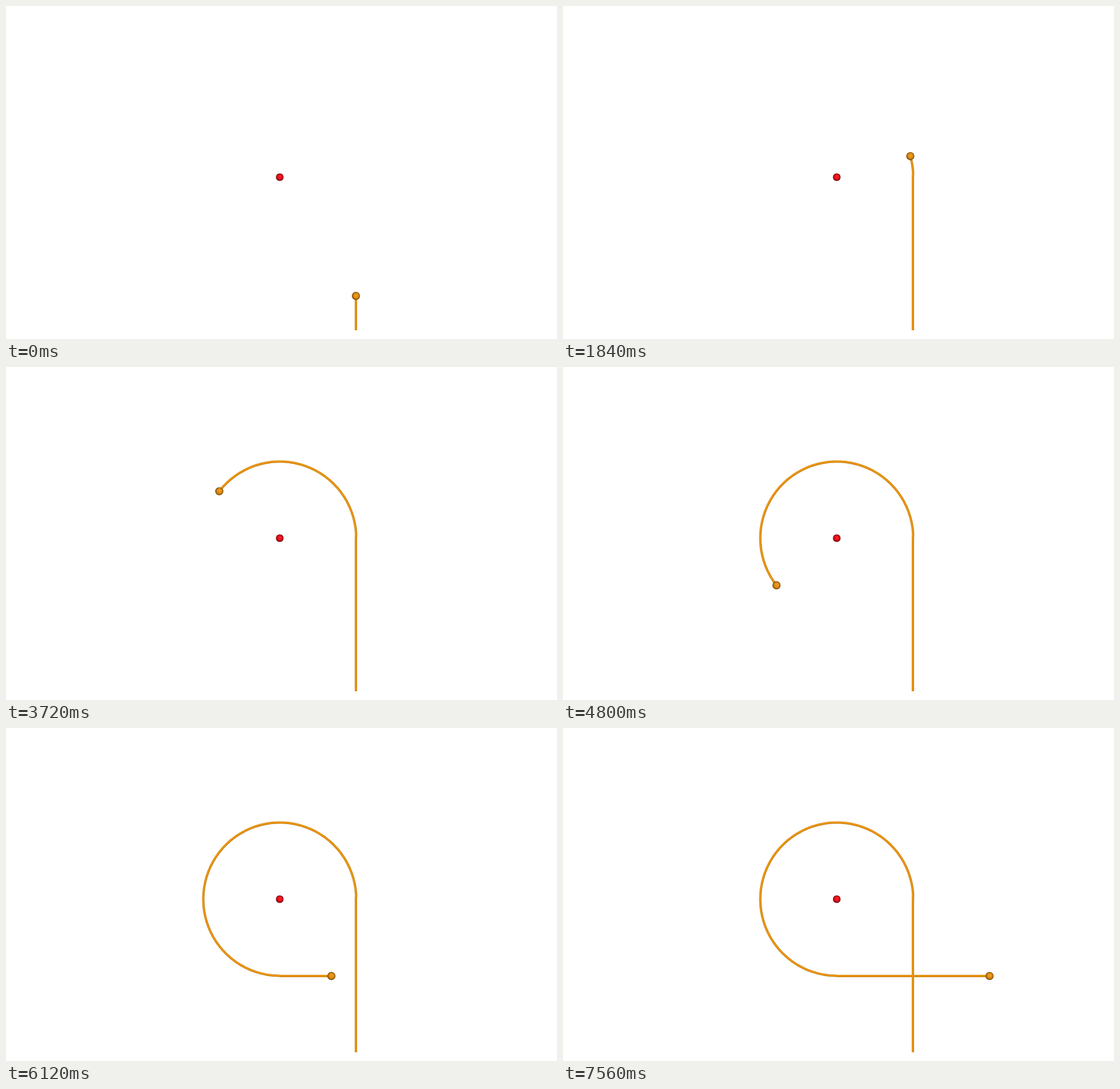
An HTML page with a canvas for the animation above (7640 ms loop, 948 by 572 pixels).

```html
<!DOCTYPE html>
<html>
<head>
<meta charset="utf-8">
<style>
html, body { margin: 0; width: 100%; height: 100%; overflow: hidden; background: #fff; }
canvas { display: block; }
</style>
</head>
<body>
<canvas id="stage" width="948" height="572"></canvas>
<script>
const ctx = document.getElementById('stage').getContext('2d');
const LOOP = 7640, TICK = 40;
const CX = 471, CY = 294, R = 131.6;
const ENTER = 22, EXIT = 86, LAST = 113; // steps where the field begins, ends, and the run stops

// [time in ms, steps done]: the simulation runs at a slightly uneven pace
const PACE = [[0, 0], [1600, 21], [1840, 25], [2400, 35], [3040, 43], [3200, 47], [3720, 55],
  [4000, 59], [4800, 73], [6120, 95], [6400, 99], [7200, 112], [7240, LAST]];

function stepAt(t) {
  const i = PACE.findIndex(p => p[0] > t);
  if (i < 0) return LAST;
  const [t0, n0] = PACE[i - 1], [t1, n1] = PACE[i];
  return Math.floor(n0 + (n1 - n0) * (t - t0) / (t1 - t0) + 1e-6);
}

function place(n) {
  if (n < ENTER) return [602, 498 - 9.62 * n];
  if (n >= EXIT) return [472.8 + 9.67 * (n - EXIT), 426];
  const a = (3.3 + 4.21 * (n - ENTER)) * Math.PI / 180;
  return [CX + R * Math.cos(a), CY - R * Math.sin(a)];
}

function tube(points, width, color, dx = 0, dy = 0) {
  ctx.beginPath();
  points.forEach(([x, y]) => ctx.lineTo(x + dx, y + dy));
  ctx.lineWidth = width;
  ctx.strokeStyle = color;
  ctx.stroke();
}

function ball(x, y, r, light, mid, dark) {
  const g = ctx.createRadialGradient(x + 0.8, y - 1.2, 0.5, x, y, r);
  g.addColorStop(0, light);
  g.addColorStop(0.6, mid);
  g.addColorStop(1, dark);
  ctx.beginPath();
  ctx.arc(x, y, r, 0, 2 * Math.PI);
  ctx.fillStyle = g;
  ctx.fill();
}

function draw(t) {
  const n = stepAt(t);
  const trail = [[602, 557]];
  for (let i = -5; i <= n; i++) trail.push(place(i));

  ctx.fillStyle = '#fff';
  ctx.fillRect(0, 0, 948, 572);
  ctx.lineJoin = 'round';
  tube(trail, 4, '#c87c0c');
  tube(trail, 2.3, '#ee980f', -0.2, -0.3);
  ball(CX, CY, 6.6, '#f8202a', '#e30c18', '#5c080c');
  ball(...place(n), 7, '#f0a022', '#d9860c', '#6b430a');
}

function frame(now) {
  const t = now % LOOP;
  draw(Math.floor(t / TICK) * TICK);
  requestAnimationFrame(frame);
}
draw(0);
requestAnimationFrame(frame);
</script>
</body>
</html>
```
